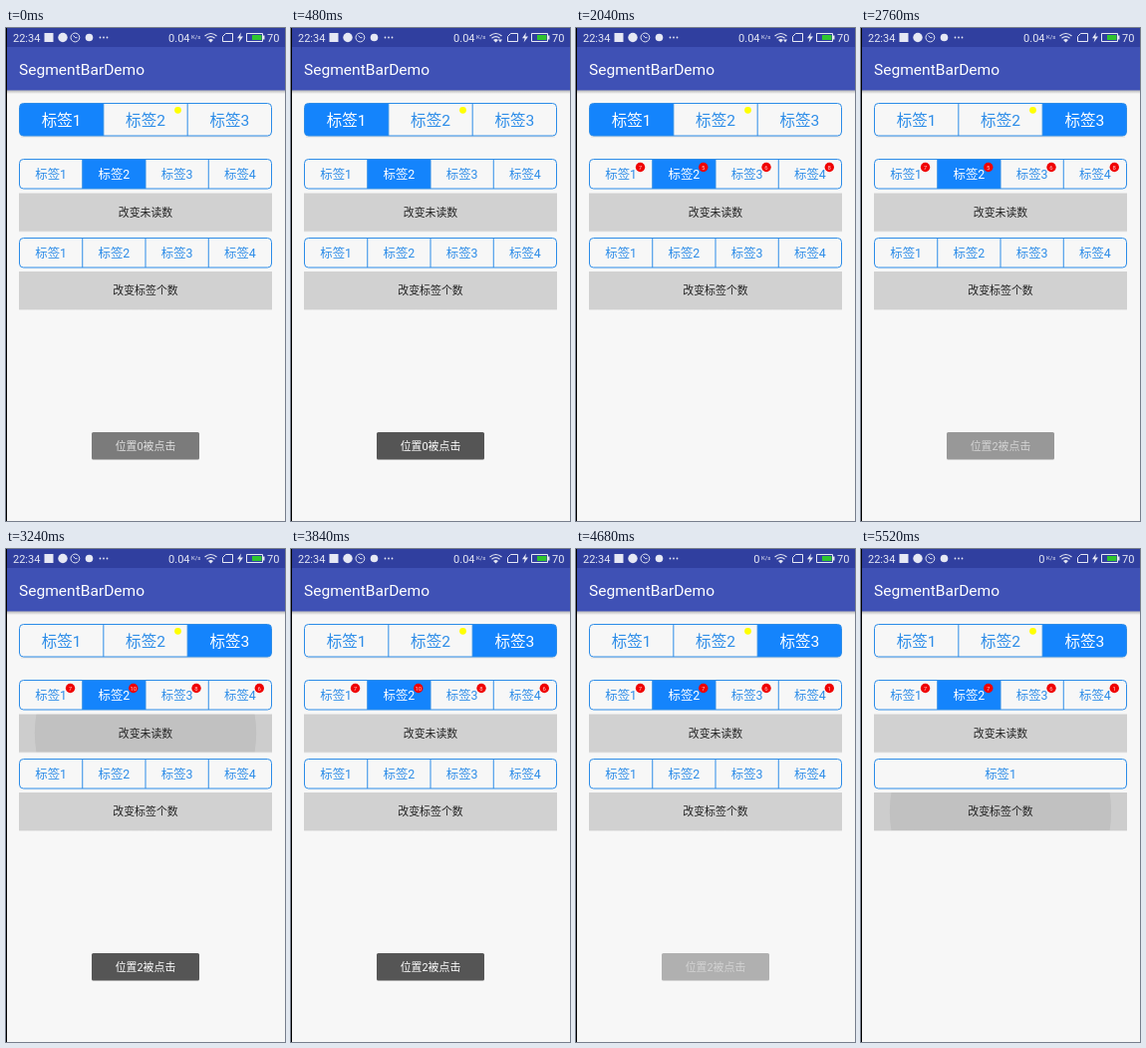
An HTML page with a canvas that plays this animation: 280x494 px, repeating every 5.64 s.

```html
<!DOCTYPE html>
<html lang="zh">
<head>
<meta charset="utf-8">
<style>
html, body { margin: 0; width: 100%; height: 100%; overflow: hidden; background: #f7f7f7; }
canvas { display: block; width: 280px; height: 494px; }
</style>
</head>
<body>
<canvas id="stage"></canvas>
<script>
const W = 280, H = 494, LOOP = 5640, STEP = 120;
const FONT = 'Roboto, "Noto Sans CJK SC", "Noto Sans CJK", sans-serif';
const BLUE = '#1484fc', LINE = '#2c8ce8', ICON = '#e6e8f4';

const stage = document.getElementById('stage');
const ctx = stage.getContext('2d');
const dpr = window.devicePixelRatio || 1;
stage.width = W * dpr;
stage.height = H * dpr;
ctx.scale(dpr, dpr);

// Taps on the two buttons and the unread counts they lead to
const unreadTaps = [1560, 3120, 4080];
const unreadCounts = [[7, 5, 6, 8], [7, 10, 8, 6], [7, 7, 6, 1]];
const countTap = 5400;
const toasts = [
  { text: '位置0被点击', start: -255, end: 940 },
  { text: '位置2被点击', start: 2584, end: 4305 },
];

const clamp = v => Math.min(1, Math.max(0, v));

function text(str, x, cy, size, color, align = 'center') {
  ctx.font = `${size}px ${FONT}`;
  ctx.textAlign = align;
  ctx.fillStyle = color;
  ctx.fillText(str, x, cy + size * 0.37);
}

function rect(x, y, w, h, color) {
  ctx.fillStyle = color;
  ctx.fillRect(x, y, w, h);
}

function disc(x, y, r, color) {
  ctx.fillStyle = color;
  ctx.beginPath();
  ctx.arc(x, y, r, 0, Math.PI * 2);
  ctx.fill();
}

function stroke(path, color = ICON, width = 1) {
  ctx.strokeStyle = color;
  ctx.lineWidth = width;
  ctx.stroke(new Path2D(path));
}

function fill(path, color = ICON) {
  ctx.fillStyle = color;
  ctx.fill(new Path2D(path));
}

function shadow(y, h, alpha, x = 0, w = W) {
  const g = ctx.createLinearGradient(0, y, 0, y + h);
  g.addColorStop(0, `rgba(0,0,0,${alpha})`);
  g.addColorStop(1, 'rgba(0,0,0,0)');
  rect(x, y, w, h, g);
}

function statusBar(t) {
  rect(0, 0, W, 19, '#303f9f');
  text('22:34', 7, 9.5, 11, ICON, 'left');
  rect(38.5, 5, 9, 9, ICON);
  disc(57, 9.5, 4.7, ICON);
  stroke('M65 9.5a4.4 4.4 0 1 0 8.8 0a4.4 4.4 0 1 0 -8.8 0M67.5 7.5L69.5 9.7H71.5');
  disc(83.5, 9.5, 3.8, ICON);
  for (let i = 0; i < 3; i++) disc(94.5 + i * 3.5, 9.5, 0.9, ICON);

  text(t < 4200 ? '0.04' : '0', 184.5, 9.5, 11, ICON, 'right');
  text('K/s', 186, 9, 6, ICON, 'left');
  stroke('M199.5 8Q205.5 3 211.5 8M201.5 10.3Q205.5 7 209.5 10.3', ICON, 1.2);
  fill('M203 12Q205.5 10 208 12L205.5 14.5Z');
  if (t >= 120 && t < 2520) fill('M208 11.5h4l-2 3z');
  stroke('M220.5 5.5H227.5V13.5H217.5V8.5Z');
  fill('M236 4.5L232 10.2H234.6L233.6 14.5L238 8.6H235.2Z');
  stroke('M241.5 5.5H257.5V13.5H241.5Z');
  rect(258, 7.5, 1.5, 4, ICON);
  rect(247, 7, 9.5, 5, '#2fc52f');
  text('70', 262, 9.5, 11, ICON, 'left');
}

function segments(y, h, count, size, selected, badges) {
  const x = 13.5, w = 253, cell = w / count;
  const frame = new Path2D();
  frame.roundRect(x, y, w, h, 4);
  ctx.save();
  ctx.clip(frame);
  if (selected >= 0) rect(x + selected * cell, y, cell, h, BLUE);
  ctx.restore();
  for (let i = 0; i < count; i++) {
    const left = x + i * cell;
    if (i) stroke(`M${left} ${y}v${h}`, LINE);
    text('标签' + (i + 1), left + cell / 2, y + h / 2 + 0.3, size,
      i === selected ? '#fff' : LINE);
  }
  ctx.strokeStyle = LINE;
  ctx.lineWidth = 1;
  ctx.stroke(frame);
  if (badges) badges.forEach((n, i) => {
    const bx = x + (i + 1) * cell - 12.2;
    disc(bx, 139.5, 4.7, '#f00000');
    text(n, bx, 139.5, 6, '#ffd0d0');
  });
}

function button(y, label, age) {
  rect(13, y, 254, 38, '#d1d1d1');
  if (age >= 0 && age < 480) {
    ctx.save();
    ctx.beginPath();
    ctx.rect(13, y, 254, 38);
    ctx.clip();
    const alpha = 0.06 * (1 - clamp((age - 120) / 360));
    rect(13, y, 254, 38, `rgba(0,0,0,${alpha / 3})`);
    disc(140, y + 19, 20 + age * 0.76, `rgba(0,0,0,${alpha})`);
    ctx.restore();
  }
  shadow(y + 38, 1.5, 0.08, 13, 254);
  text(label, 140, y + 19, 10.9, '#222');
}

function toast({ text: label, start, end }, t) {
  const enter = clamp((t - start) / 500), exit = clamp((t - end) / 500);
  const alpha = (1 - (1 - enter) ** 2) * (1 - exit ** 2);
  if (alpha <= 0) return;
  ctx.globalAlpha = alpha;
  ctx.fillStyle = '#555';
  ctx.beginPath();
  ctx.roundRect(86, 405, 108, 27.5, 1.6);
  ctx.fill();
  text(label, 140, 419, 10.9, '#fff');
  ctx.globalAlpha = 1;
}

function draw(t) {
  rect(0, 0, W, H, '#f7f7f7');
  statusBar(t);
  rect(0, 19, W, 43.5, '#3f51b5');
  shadow(62.5, 3.5, 0.25);
  text('SegmentBarDemo', 13, 41.5, 15.55, '#fff', 'left');

  const taps = unreadTaps.filter(tap => t >= tap + STEP).length;
  const lastTap = unreadTaps.filter(tap => t >= tap).pop() ?? Infinity;

  shadow(108.5, 1.5, 0.15, 15, 250);
  segments(75.5, 32.5, 3, 15.55, t < 2520 ? 0 : 2);
  disc(172.5, 82.3, 3.4, '#ffff00');
  segments(131.5, 29.5, 4, 12.4, 1, unreadCounts[taps - 1]);
  button(165.5, '改变未读数', t - lastTap);
  segments(210.5, 29.5, t < countTap + STEP ? 4 : 1, 12.4, -1);
  button(244, '改变标签个数', t - countTap);
  toasts.forEach(item => toast(item, t));
  rect(0, 0, 1, H, '#000');
}

function tick() {
  const t = performance.now() % LOOP;
  draw(Math.floor(t / STEP) * STEP);
  requestAnimationFrame(tick);
}
tick();
</script>
</body>
</html>
```
